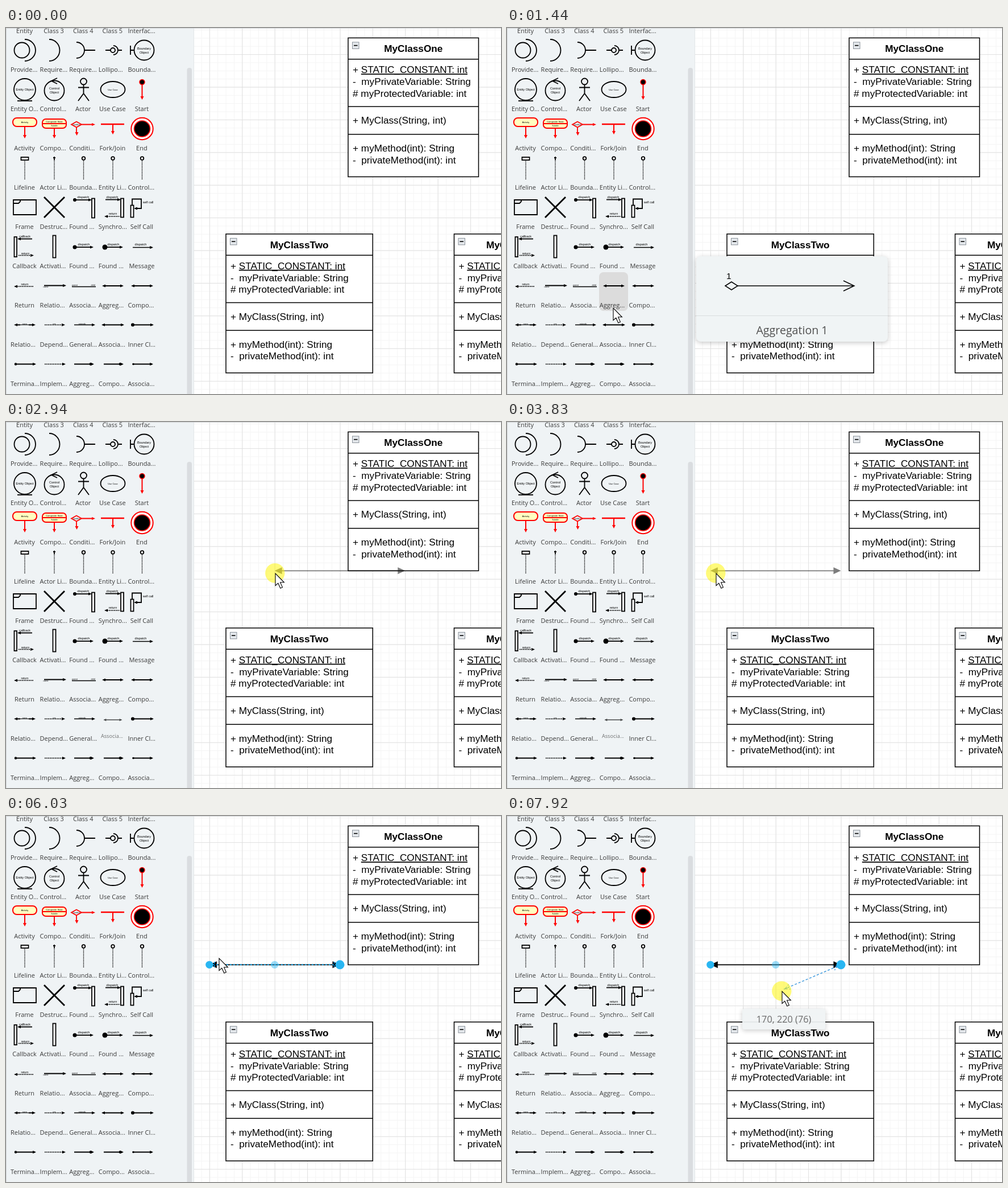
Write an HTML page that moves like this. It is 871 by 643 pixels and loops after 7990 ms.

```html
<!DOCTYPE html>
<html lang="en">
<head>
<meta charset="utf-8">
<title>Class diagram editor</title>
<style>
html, body { margin: 0; width: 100%; height: 100%; overflow: hidden; background: #fff; }
svg { display: block; width: 871px; height: 643px; }
text { white-space: pre; }
.label { font: 11px "Open Sans", sans-serif; fill: #3a3a3a; }
.tiny { font: 5.6px "Liberation Sans", sans-serif; fill: #000; text-anchor: middle; }
.uml { font: 17.2px "Liberation Sans", sans-serif; fill: #000; }
.bold { font-weight: bold; text-anchor: middle; }
.title { font: 19.6px "Open Sans", sans-serif; fill: #505050; text-anchor: middle; }
.tip { font: 16.3px "Open Sans", sans-serif; fill: #6b6b6b; text-anchor: middle; }
.panel { fill: #f0f4f5; filter: drop-shadow(0 2px 4px rgba(0,0,0,.22)); }
</style>
</head>
<body>
<svg id="stage" viewBox="0 0 871 643" xmlns="http://www.w3.org/2000/svg"></svg>
<script>
const LOOP = 7990;
const UNIT = 14.35, OX = 243.1, OY = -11.3;   // diagram grid
const COL = 51.6, ROW = 68.9;                 // palette cells
const BLUE = '#29b6f2';

// ---------- drawing helpers ----------
const path = (d, w = 1.8, more = '') =>
  `<path d="${d}" fill="none" stroke="#000" stroke-width="${w}" ${more}/>`;
const red = (d, w = 2, fill = 'none') =>
  `<path d="${d}" fill="${fill}" stroke="#f00" stroke-width="${w}"/>`;
const ring = (x, y, r, w = 1.8, fill = 'none', stroke = '#000') =>
  `<circle cx="${x}" cy="${y}" r="${r}" fill="${fill}" stroke="${stroke}" stroke-width="${w}"/>`;
const dot = (x, y, r, fill = '#000', more = '') =>
  `<circle cx="${x}" cy="${y}" r="${r}" fill="${fill}" ${more}/>`;
const box = (x, y, w, h, sw = 1.8) =>
  `<rect x="${x}" y="${y}" width="${w}" height="${h}" fill="#fff" stroke="#000" stroke-width="${sw}"/>`;
const text = (cls, x, y, s) => `<text class="${cls}" x="${x}" y="${y}">${s}</text>`;
const tiny = (x, y, s, size = 5.6) =>
  `<text class="tiny" x="${x}" y="${y}" style="font-size:${size}px">${s}</text>`;
const head = (x, y, dir, len = 6, half = 2.6, fill = '#000') =>
  `<path d="M${x} ${y}l${-dir * len} ${-half}v${2 * half}z" fill="${fill}"/>`;
const down = (x, y) => `<path d="M${x} ${y}l-3 -6h6z" fill="#f00"/>`;
const link = (x1, x2, y, ends, w = 1.8, dash = '') =>
  path(`M${x1 + 2} ${y}H${x2 - 2}`, w, dash && `stroke-dasharray="${dash}"`) +
  (ends.includes('<') ? head(x1, y, -1) : '') +
  (ends.includes('>') ? head(x2, y, 1) : '');
const edge = (x1, x2, y) =>
  path(`M${x1 + 10} ${y}H${x2 - 10}`) + head(x1, y, -1, 13, 6) + head(x2, y, 1, 13, 6);

// ---------- palette ----------
const names = [
  'Entity|Class 3|Class 4|Class 5|Interfac...',
  'Provide...|Require...|Require...|Lollipo...|Bounda...',
  'Entity O...|Control...|Actor|Use Case|Start',
  'Activity|Compo...|Conditi...|Fork/Join|End',
  'Lifeline|Actor Li...|Bounda...|Entity Li...|Control...',
  'Frame|Destruc...|Found ...|Synchro...|Self Call',
  'Callback|Activati...|Found ...|Found ...|Message',
  'Return|Relatio...|Associa...|Aggreg...|Compo...',
  'Relatio...|Depend...|General...|Associa...|Inner Cl...',
  'Termina...|Implem...|Aggreg...|Compo...|Associa...'
].map(r => r.split('|'));

const label = (r, c) => {
  const s = names[r][c], y = 8.5 + r * ROW;
  return s.endsWith('...') ? text('label', 8 + c * COL, y, s)
    : `<text class="label" text-anchor="middle" x="${32.5 + c * COL}" y="${y}">${s}</text>`;
};

const basics =
  ring(28, 39, 13.5) + path('M33 20A19 19 0 0 1 33 58') +
  path('M76 20A18.5 19 0 0 1 76 58') +
  path('M124 25A14 14 0 0 1 124 53M138 39H157') +
  path('M175 39H184M197 39H204M189 31A8 8 0 0 1 189 47') + ring(188, 39, 4) +
  path('M219 31V47M219 39H226') + ring(243, 39, 17.5) +
  tiny(243, 38, 'Boundary') + tiny(243, 45, 'Object') +
  ring(33, 108, 19) + path('M20 128H46') + tiny(33, 110, 'Entity Object') +
  ring(85, 110, 17.5) + path('M90 88L80 93L90 98') + tiny(85, 108, 'Control') + tiny(85, 115, 'Object') +
  ring(136.5, 94, 5.5) + path('M136.5 99.5V115M127 104.5H146M127 128L136.5 115L146 128') +
  '<ellipse cx="188" cy="108" rx="21.5" ry="14" fill="none" stroke="#000" stroke-width="1.8"/>' +
  tiny(188, 110, 'Use Case', 4) +
  red('M239.5 98V120') + ring(239.5, 95, 4.5, 1.5, '#000', '#f00') + down(239.5, 126);

const flows =
  red('M33 173V189') + down(33, 194) +
  '<rect x="12" y="158" width="42" height="15" rx="7" fill="#ffffc0" stroke="#f00" stroke-width="2"/>' +
  tiny(33, 167, 'Activity', 4) +
  red('M85 177V189') + down(85, 194) +
  '<rect x="64" y="160" width="42" height="16" rx="6" fill="#ffffc0" stroke="#f00" stroke-width="2"/>' +
  red('M64 168H106') + tiny(85, 165.5, 'Composite State', 4) + tiny(85, 173, 'Subtitle', 3.5) +
  red('M115 169.5L124 164.5L133 169.5L124 174.5ZM133 169.5H152M124 175V184', 1.8) +
  head(157, 169.5, 1, 6, 2.6, '#f00') + down(124.5, 189) + tiny(124, 170.5, 'Condition', 3) +
  red('M167 169H208', 2.4) + red('M188 169V182') + down(188, 187) +
  ring(239.5, 177, 19.2, 2, '#fff', '#f00') + ring(239.5, 177, 14, 1.5, '#000', '#f00') +
  [33, 85, 136.5, 188, 239.5].map(x => path(`M${x} 232V266`, 1.3, 'stroke-dasharray="1.5 1"')).join('') +
  box(26.5, 227, 13, 5) + path('M85 226V232M83 228H87') +
  [136.5, 188, 239.5].map(x => ring(x, 229, 2.8, 1.8, '#fff')).join('');

const messages =
  path('M13 302H53V328H13ZM13 308H22L25 305V302') +
  path('M67 297L103 333M103 297L67 333', 2.8) +
  dot(121, 302, 3) + link(121, 151, 302, '>') + box(151, 299.5, 5, 34) + tiny(136, 299, 'dispatch') +
  box(202, 299.5, 5, 33) + link(173, 202, 301.5, '>') + tiny(187, 298.5, 'dispatch') +
  link(173, 202, 331, '<', 1.6, '2 1') + tiny(188, 328, 'return') +
  box(219.5, 311.5, 5, 21) + path('M222 311V300.5H238V317H230') + head(225, 317, -1) + tiny(250, 308, 'self call') +
  box(14.5, 367, 4.5, 35) + link(20, 48, 370.5, '<') + tiny(33, 367.5, 'callback') +
  link(20, 49, 399.5, '>', 1.6, '2 1') + tiny(34, 397.5, 'return') +
  box(82.5, 364.5, 5, 39) +
  dot(121, 385, 3.5) + link(121, 154, 385, '>') + tiny(137, 382, 'dispatch') +
  dot(174, 385, 4.5) + link(174, 206, 385, '>') + tiny(189, 382, 'dispatch') +
  link(221, 259, 385.5, '>', 1.5) + tiny(237, 382, 'dispatch');

const links =
  link(14, 51, 454, '<', 1.5, '2 1') + tiny(33, 451.5, 'return', 5) +
  link(65, 106, 452.5, '>') + tiny(70, 456, 'name', 3.5) +
  path('M116 454.5H158', 1.3) + tiny(121, 453, 'parent', 3.5) + tiny(153, 453, 'child', 3.5) +
  link(169, 207, 453, '<>') + link(220, 259, 453, '<>') +
  link(14, 52, 521.5, '<>', 1.2) + path('M18 521.5H25M40 521.5H47', 2.2) + tiny(33, 520.5, 'name', 3.5) +
  link(66, 104, 521.5, '>', 1.3, '2 1') + tiny(85, 520.5, 'use', 3) +
  link(118, 157, 521.5, '>', 1.5) + tiny(134, 520.5, 'extends', 3.5) +
  dot(223, 521.5, 3) + link(222, 260, 521.5, '>') +
  dot(17, 590.5, 2.2) + link(15, 53, 590.5, '>') +
  link(66, 105, 590.5, '>', 1.3, '2 1') +
  link(118, 155, 590.5, '>') + dot(149, 590.5, 2.4) +
  link(170, 207, 590.5, '>') + dot(201, 590.5, 2.4) +
  link(221, 259, 590.5, '>') + dot(224, 590.5, 1.8);

const labels = names.map((r, i) => r.map((_, j) => i === 8 && j === 3 ? '' : label(i, j)).join('')).join('');

const sidebar =
  '<rect width="330.5" height="643" fill="#eff3f5"/>' +
  '<rect x="318.5" y="70" width="8.5" height="580" rx="4" fill="#dadde0"/>' +
  '<path d="M330.5 0V643" stroke="#e3e6e8"/>' +
  '<rect id="hover" width="51" height="68" rx="8" fill="#dcdcdc"/>' +
  basics + flows + messages + links + labels +
  `<g id="cell"><rect id="press" x="162" y="498" width="51" height="68" rx="8" fill="#dcdcdc"/>${
    link(168, 208, 521.5, '<>')}${label(8, 3)}</g>` +
  '<path d="M0 .5H871M.5 0V643" stroke="#d3d6d8"/>';

// ---------- diagram ----------
const rows = [
  [79.2, '+ <tspan text-decoration="underline">STATIC_CONSTANT: int</tspan>'],
  [100.2, '-&#160; myPrivateVariable: String'], [120.6, '# myProtectedVariable: int'],
  [168.4, '+ MyClass(String, int)'],
  [217.2, '+ myMethod(int): String'], [238, '-&#160; privateMethod(int): int']
];
const umlClass = (x, y, w, name) => `<g transform="translate(${x} ${y})">` +
  box(0, 0, w, 244, 1.5) + path(`M0 37.3H${w}M0 120.5H${w}M0 169.3H${w}`, 1.5) +
  '<rect x="7.5" y="7.5" width="11.5" height="11.5" fill="#e4e8ec" stroke="#8a929a"/>' +
  path('M10 13.3H16.5', 1.6) + text('uml bold', w / 2, 24.8, name) +
  rows.map(([b, s]) => text('uml', 8, b - 17.4, s)).join('') + '</g>';

const grid = (id, size, color) =>
  `<pattern id="${id}" width="${size}" height="${size}" x="${OX}" y="${OY}" patternUnits="userSpaceOnUse">` +
  `<path d="M0 0H${size}M0 0V${size}" stroke="${color}" stroke-width="2" fill="none"/></pattern>`;
const fillAll = id => `<rect x="331" width="540" height="643" fill="url(#${id})"/>`;

const canvas = '<rect x="331" width="540" height="643" fill="#fff"/>' +
  fillAll('minor') + fillAll('major') +
  umlClass(602, 17.4, 229.5, 'MyClassOne') +
  umlClass(387, 361.9, 258.3, 'MyClassTwo') +
  umlClass(788.5, 361.9, 229.5, 'MyClassThree');

const LX = OX + 8 * UNIT, RX = OX + 24 * UNIT, LY = OY + 19 * UNIT;
const placed = `<g id="placed">${edge(LX, RX, LY)}
  <path id="dash" d="M${LX} ${LY}H${RX}M${LX + 9} ${LY - 5}v10M${RX - 10} ${LY - 5}v10"
    stroke="#00a8ff" stroke-width="1.5" stroke-dasharray="3 3"/>
  <path id="pull" fill="none" stroke="#3a97dc" stroke-width="1.4" stroke-dasharray="4 3"/>
  ${dot((LX + RX) / 2, LY, 6.7, BLUE, 'opacity=".45"')}${dot(LX, LY, 6.7, BLUE)}${dot(RX, LY, 8, BLUE)}</g>`;

const popup = (id, top, h, name, art) => `<g id="${id}">
  <rect class="panel" x="333" y="${top}" width="337" height="${h}" rx="8"/>
  <path d="M333 ${top + h - 45.5}H670" stroke="#d8dcde"/>
  ${art}${text('title', 501.5, top + h - 13.5, name)}</g>`;
const diamondLine = fill =>
  path('M406 453H611M592 444L611 453L592 462', 1.5) +
  `<path d="M384 453l11 -7l11 7l-11 7z" fill="${fill}" stroke="#000" stroke-width="1.5"/>` +
  '<text x="386" y="441" style="font:15.5px \'Liberation Sans\',sans-serif">1</text>';

document.getElementById('stage').innerHTML =
  `<defs>${grid('minor', UNIT, '#f4f4f4')}${grid('major', 4 * UNIT, '#e0e0e0')}
   <clipPath id="view"><rect x="331" width="540" height="643"/></clipPath></defs>` +
  canvas + placed + `<g id="ghost" opacity=".5">${edge(0, 16 * UNIT, 0)}</g>` + sidebar +
  popup('popA', 401, 150, 'Composition 1', diamondLine('#000')) +
  popup('popB', 401, 150, 'Aggregation 1', diamondLine('#f0f4f5')) +
  popup('popC', 481, 127, 'Association 2', edge(386, 616, 522)) +
  `<g clip-path="url(#view)"><g id="tip"><rect class="panel" x="-73" y="34" width="146" height="36.5" rx="4" opacity=".93"/>
   <text id="tipText" class="tip" y="59"></text></g></g>
   <g id="mouse">${dot(-.7, -.5, 17.2, '#fff600', 'id="glow" opacity=".52"')}
   <path d="M0 0V21.5L4.8 17.2L8.8 26L12.4 24.4L8.6 15.8H15.4Z" fill="#fff" stroke="#000" stroke-width="1.1"/></g>`;

// ---------- motion ----------
// bursts of movement: first change, last change, number of steps
const bursts = [[260, 820, 9], [1090, 1720, 10], [2190, 2940, 12], [3010, 3290, 5], [3690, 3970, 5],
  [4170, 4380, 4], [4780, 5060, 5], [5330, 6100, 12], [6170, 6380, 4], [6640, 6780, 3],
  [7180, 7180, 1], [7440, 7920, 8]];
// pointer: time, x, y
const route = [
  [190, 758, -40], [260, 758, 1], [400, 640, 130], [610, 310, 425], [750, 240, 470], [1020, 240, 470],
  [1300, 187, 490], [1440, 187, 492], [1650, 189, 525], [2190, 189, 525], [2800, 488, 295], [2940, 474, 266],
  [3290, 390, 222], [3620, 390, 222], [3830, 368, 266], [3970, 360, 267], [4710, 360, 267], [5060, 356, 288],
  [5260, 356, 288], [5470, 450, 306], [5680, 546, 275], [5820, 480, 237], [6030, 375, 250], [6100, 372, 251],
  [6380, 354, 263], [6570, 354, 263], [6780, 354, 258], [7370, 354, 258], [7920, 484, 308]
];

const $ = id => document.getElementById(id);
const show = (id, on) => { $(id).style.display = on ? '' : 'none'; };
const move = (id, x, y) => $(id).setAttribute('transform', `translate(${x} ${y})`);

// time of the latest visible step
function stepped(t) {
  const burst = bursts.filter(b => t >= b[0]).pop();
  if (!burst) return 0;
  const [start, end, n] = burst;
  if (t >= end) return end;
  const step = (end - start) / (n - 1);
  return start + step * Math.floor((t - start) / step + .01);
}

function pointer(t) {
  if (t <= route[0][0]) return route[0].slice(1);
  const i = route.findIndex(k => k[0] >= t);
  const a = route[i - 1], b = route[i], f = (t - a[0]) / (b[0] - a[0]);
  return [a[1] + (b[1] - a[1]) * f, a[2] + (b[2] - a[2]) * f];
}

function pull(x, y) {
  const gx = Math.round((x - OX) / UNIT), gy = Math.round((y - OY) / UNIT);
  const px = OX + gx * UNIT, py = OY + gy * UNIT;
  const a = Math.atan2(LY - py, RX - px);
  const barb = (bx, by, dir) => [-.5, .5].map(d =>
    `M${bx} ${by}l${9 * Math.cos(dir + d)} ${9 * Math.sin(dir + d)}`).join('');
  $('pull').setAttribute('d', `M${px} ${py}L${RX} ${LY}` +
    barb(px + 3 * Math.cos(a), py + 3 * Math.sin(a), a) +
    barb(RX - 6 * Math.cos(a), LY - 6 * Math.sin(a), a + Math.PI));
  move('tip', px, py);
  $('tipText').textContent = `${gx * 10}, ${gy * 10} (${Math.round(10 * Math.hypot(24 - gx, 19 - gy))})`;
}

function draw(now) {
  const t = stepped(now % LOOP), [x, y] = pointer(t);
  const within = (a, b) => t >= a && t < b;
  move('mouse', x, y);
  show('glow', within(2190, 4170) || t >= 7180);

  const c = x < 213.5 ? 3 : 4, r = y < 497.5 ? 0 : 1;
  show('hover', within(680, 2190) && x < 266);
  move('hover', 162 + (c - 3) * 52, 429 + r * ROW);
  show('popA', within(820, 1230));
  show('popB', within(1300, 1580));
  show('popC', within(1650, 2190));

  const held = within(2190, 4170), k = !held ? 1 : t < 2250 ? .93 : .83;
  $('cell').setAttribute('transform', `translate(187.5 532) scale(${k}) translate(-187.5 -532)`);
  $('cell').setAttribute('opacity', held ? .7 : 1);
  show('press', within(2190, 2250));

  show('ghost', held && x > 331);
  move('ghost', OX + Math.floor((x - OX) / UNIT) * UNIT, OY + Math.floor((y - OY) / UNIT) * UNIT);

  const pulling = t >= 7440;
  show('placed', t >= 4170);
  show('dash', !pulling);
  show('pull', pulling);
  show('tip', pulling);
  if (pulling) pull(x, y);
}

const begin = performance.now();
function tick() {
  draw(performance.now() - begin);
  requestAnimationFrame(tick);
}
tick();
</script>
</body>
</html>
```
